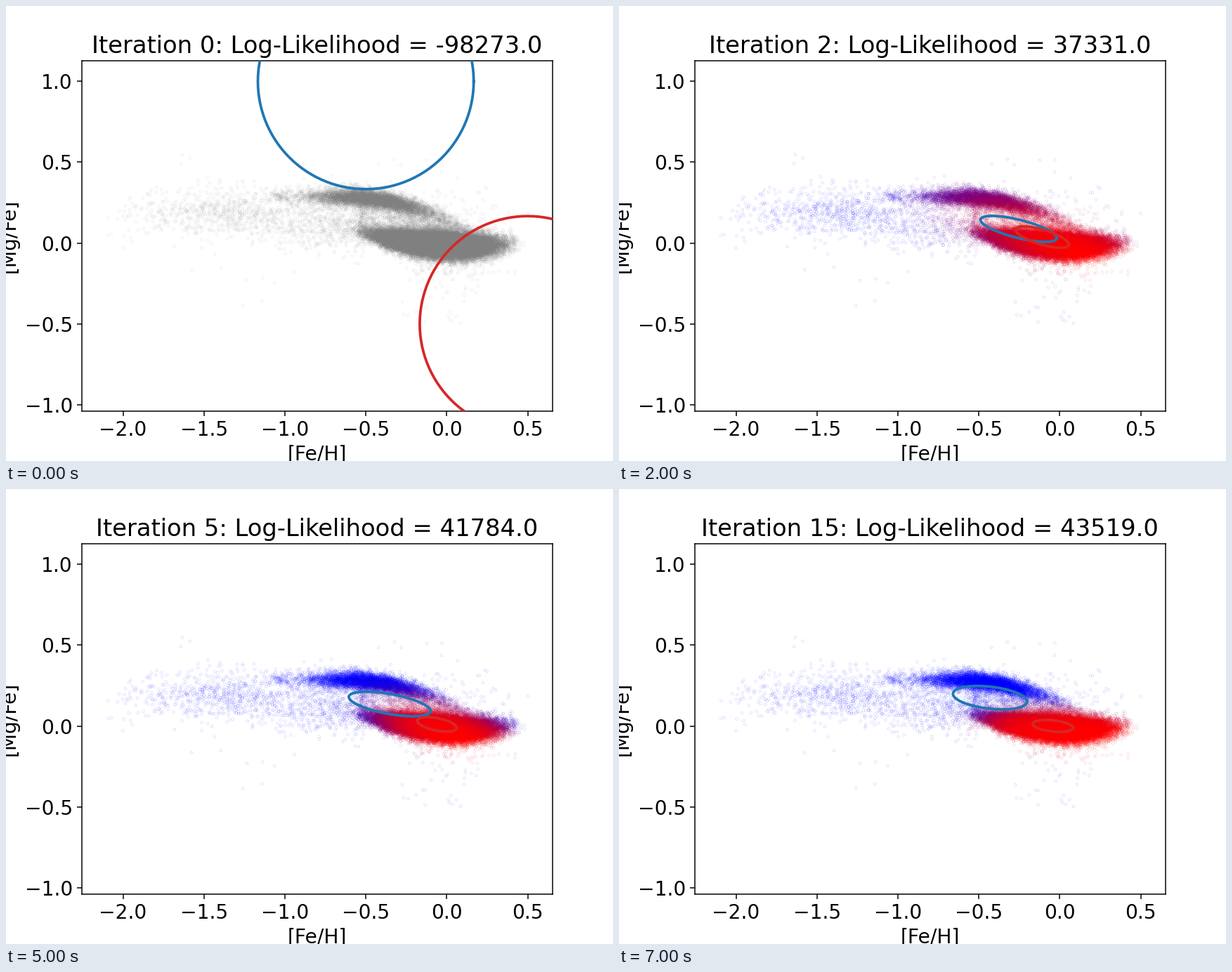
Animation of 864 by 648 pixels, one loop 8 s. Source, as a matplotlib script:

```python
import numpy as np
import matplotlib.pyplot as plt
from matplotlib.animation import FuncAnimation

plt.rcParams["font.family"] = "DejaVu Sans"
plt.rcParams["font.size"] = 15
rng = np.random.default_rng(7)

LOG_LIKELIHOOD = {0: -98273, 1: 35413, 2: 37331, 3: 38658,
                  4: 40198, 5: 41784, 10: 43478, 15: 43519}
ITERATIONS = list(LOG_LIKELIHOOD)
RADIUS = 2 / 3  # ellipse radius in standard deviations

# each component: centre x, centre y, half width, half height
BLUE = dict(color="tab:blue", start=(-0.5, 1.0), rate=0.085, bulge=0.1,
            first=(-0.238, 0.080, 0.228, 0.081), last=(-0.431, 0.1755, 0.2285, 0.0725))
RED = dict(color="tab:red", start=(0.5, -0.5), rate=0.135, bulge=-0.09,
           first=(-0.118, 0.042, 0.182, 0.070), last=(-0.042, 0.001, 0.1245, 0.037))


def progress(k, rate):
    return 1 - np.exp(-rate * (k - 1) ** 1.7)


def ellipse(part, k):
    """Centre, half sizes and correlation of a component after k iterations."""
    if k == 0:
        return (*part["start"], RADIUS, RADIUS, 0)
    p = progress(k, part["rate"])
    cx, cy, hx, hy = (a + (b - a) * p for a, b in zip(part["first"], part["last"]))
    return cx, cy, hx + part["bulge"] * p * (1 - p), hy, -0.7 + 0.37 * p * p


def blue_weight(k):
    return 0.5 if k == 0 else 0.43 - 0.13 * progress(k, BLUE["rate"])


def upper_ridge(x):
    return 0.285 - 0.33 * np.clip(x + 0.65, 0, 0.9) ** 2


def lower_ridge(x):
    return -0.018 + 0.18 * (x - 0.15) ** 2


def make_stars():
    def cloud(x, mid, spread):
        return np.column_stack([x, mid + spread * rng.normal(size=x.size)])

    def box(n, x0, x1, y0, y1):
        return np.column_stack([rng.uniform(x0, x1, n), rng.uniform(y0, y1, n)])

    thin = -0.65 + 1.15 * rng.beta(4.3, 4.1, 35000)
    thick = rng.normal(-0.45, 0.2, 6800)
    thick = thick[(thick > -1) & (thick < 0.15)]
    bridge = rng.uniform(-0.55, 0.12, 1500)
    mix = rng.uniform(size=bridge.size)
    middle = mix * upper_ridge(bridge) + (1 - mix) * lower_ridge(bridge)
    halo = rng.normal(-1.33, 0.32, 850)
    halo = halo[(halo > -2.12) & (halo < -0.6)]
    poor = -0.5 - 0.3 * np.abs(rng.normal(size=500))
    return rng.permutation(np.vstack([
        cloud(thin, lower_ridge(thin), 0.042 - 0.075 * thin ** 2),
        cloud(thick, upper_ridge(thick), 0.028),
        cloud(bridge, middle, 0.03),
        cloud(halo, 0.19, 0.075),
        cloud(poor, 0.1, 0.07),
        cloud(rng.normal(-1.03, 0.03, 70), 0.285, 0.02),
        cloud(rng.normal(-0.15, 0.28, 300), 0.1, 0.1),
        cloud(rng.normal(0.03, 0.14, 90), -0.17, 0.06),
        box(20, -0.3, 0.2, -0.51, -0.25),
        box(8, -1.6, -0.9, -0.4, -0.15),
        box(10, -1.7, 0.2, 0.36, 0.55),
    ]))


def log_density(shape):
    cx, cy, hx, hy, rho = shape
    sx, sy = hx / RADIUS, hy / RADIUS
    u = (stars[:, 0] - cx) / sx
    v = (stars[:, 1] - cy) / sy
    q = 1 - rho ** 2
    return -0.5 * (u * u + v * v - 2 * rho * u * v) / q - np.log(sx * sy * np.sqrt(q))


def membership_colors(k):
    w = blue_weight(k)
    logit = np.log(w / (1 - w)) + log_density(ellipse(BLUE, k)) - log_density(ellipse(RED, k))
    p = 1 / (1 + np.exp(-np.clip(logit, -50, 50)))
    p = (p - p.min()) / (p.max() - p.min())
    return np.column_stack([1 - p, np.zeros_like(p), p])


def outline(shape):
    cx, cy, hx, hy, rho = shape
    t = np.linspace(0, 2 * np.pi, 241)
    y = rho * np.cos(t) + np.sqrt(1 - rho ** 2) * np.sin(t)
    return cx + hx * np.cos(t), cy + hy * y


stars = make_stars()
fig, ax = plt.subplots(figsize=(6.4, 4.8), dpi=135)
ax.set_xlim(-2.254, 0.6523)
ax.set_ylim(-1.0376, 1.128)
ax.set_xlabel("[Fe/H]")
ax.set_ylabel("[Mg/Fe]")
title = ax.set_title("", fontsize=18)
dots = ax.scatter(stars[:, 0], stars[:, 1], s=4, facecolors="none",
                  edgecolors="gray", linewidths=0.3, alpha=0.18)
rings = [(part, ax.plot([], [], color=part["color"], lw=2, zorder=3)[0])
         for part in (BLUE, RED)]


def update(i):
    k = ITERATIONS[i]
    title.set_text(f"Iteration {k}: Log-Likelihood = {LOG_LIKELIHOOD[k]:.1f}")
    # memberships come from the parameters before this iteration's update
    dots.set_edgecolor(membership_colors(k - 1) if k else "gray")
    for part, ring in rings:
        ring.set_data(*outline(ellipse(part, k)))
    return [title, dots, *(ring for _, ring in rings)]


anim = FuncAnimation(fig, update, frames=len(ITERATIONS), interval=1000,
                     repeat=True, repeat_delay=0, blit=False)
plt.show()
```
